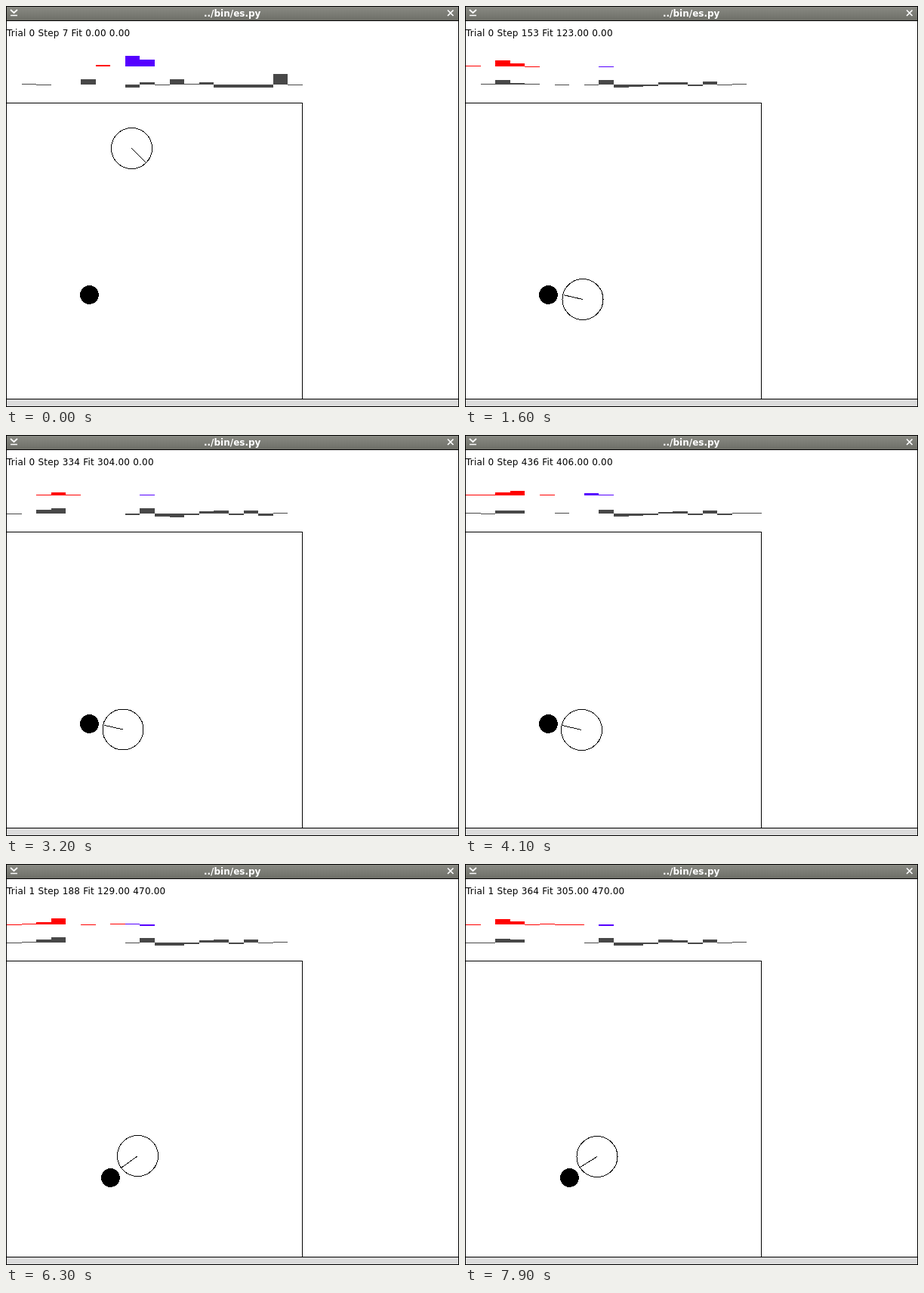
Animation, 600 px wide and 531 px high, one loop 8000 ms. Source, as an HTML page:

```html
<!DOCTYPE html>
<html lang="en">
<head>
<meta charset="utf-8">
<title>Robot trial</title>
<style>
  html, body { margin: 0; width: 100%; height: 100%; overflow: hidden; background: #fff; }
  svg { display: block; width: 600px; height: 531px; }
  text { font: 12px "DejaVu Sans", sans-serif; white-space: pre; }
  .title { font-weight: bold; fill: #fff; }
  .status { letter-spacing: .21px; }
  .crisp { shape-rendering: crispEdges; }
  .line { fill: none; stroke: #000; }
  .icon { fill: none; stroke: #fff; stroke-width: 1.7; }
</style>
</head>
<body>
<svg width="600" height="531">
  <defs>
    <linearGradient id="bar" x2="0" y2="1">
      <stop offset="0" stop-color="#8a8b84"/>
      <stop offset="1" stop-color="#6c6d66"/>
    </linearGradient>
  </defs>
  <g class="crisp">
    <rect width="600" height="531" fill="#fff"/>
    <rect width="600" height="20" fill="url(#bar)"/>
    <rect y="521" width="600" height="9" fill="#dcdcdc"/>
    <rect class="line" x=".5" y=".5" width="599" height="530"/>
    <path class="line" d="M0 19.5H600M0 520.5H600M0 128.5H392.5V520"/>
  </g>
  <path class="icon" d="M6 5l4.5 4L15 5M6 12.5h9"/>
  <path class="icon" d="M585 5.5l7.5 7.5M592.5 5.5l-7.5 7.5"/>
  <text class="title" x="262" y="14">../bin/es.py</text>
  <text class="status" id="status" x="1" y="40"></text>
  <g class="crisp">
    <path id="red" fill="#f00"/>
    <path id="blue" fill="#50f"/>
    <path id="gray" fill="#484848"/>
    <circle id="ball" r="12.4"/>
    <circle id="body" class="line" r="27"/>
    <path id="heading" class="line"/>
  </g>
</svg>
<script>
const FRAME = 100, LOOP = 8000, SECOND_TRIAL = 47;
const INPUT_BASE = 80, HIDDEN_BASE = 104;
const $ = id => document.getElementById(id);

// clock: [frame, step]; path: Bezier points of the approach; then a slow drift
const trials = [
  {
    ball: [110.5, 382.5], arrive: 30, best: 0,
    clock: [[0, 7], [8, 62], [41, 436]],
    path: [[166.5, 188.5], [235, 257], [235, 405], [156.5, 387.5]],
    drift: [-2, 3.5], turn: [193, 193], last: 492
  },
  {
    ball: [138.5, 415.5], arrive: 59, best: 470,
    clock: [[47, 3], [54, 83], [63, 188], [79, 364]],
    path: [[110, 200], [200, 150], [300, 283], [174.5, 385.5]],
    drift: [.5, 2], turn: [141, 148], last: 364
  }
];

// Unit levels at the start of a trial, and the hidden units once at the ball
const startInput = [0, 0, 0, 0, 0, 0, 2, 0, 14, 9];
const startHidden = [0, 1, -1, 0, 0, 7, 0, 0, -4, 3, -1, 7, 1, 3, -4, -4, -4, -4, 14, -1];
const restHidden = [0, 0, 0, 0, 0, 0, 0, 0, -1, 6, -4, -4, -2, 3, 3, -2, 4, -2, 1, 0];

const mix = (a, b, k) => a + (b - a) * k;
const facesBall = i => i === 2 || i === 3;

function noise(frame, i) {
  const n = Math.sin(frame * 12.9898 + i * 78.233) * 43758.5453;
  return n - Math.floor(n);
}

const jitter = (frame, i, size) => (noise(frame, i) * 2 - 1) * size;

function stepAt(clock, frame) {
  let i = 0;
  while (i < clock.length - 2 && frame >= clock[i + 1][0]) i++;
  const [f0, s0] = clock[i], [f1, s1] = clock[i + 1];
  return Math.ceil(mix(s0, s1, (frame - f0) / (f1 - f0)) - .01);
}

function approach([p0, p1, p2, p3], k) {
  const u = 1 - k;
  const at = j => u ** 3 * p0[j] + 3 * u * u * k * p1[j] + 3 * u * k * k * p2[j] + k ** 3 * p3[j];
  const slope = j => u * u * (p1[j] - p0[j]) + 2 * u * k * (p2[j] - p1[j]) + k * k * (p3[j] - p2[j]);
  return [at(0), at(1), Math.atan2(slope(1), slope(0))];
}

function hover({ path, drift, turn, arrive, last }, step) {
  const k = (step - arrive) / (last - arrive);
  const [x, y] = path[3].map((v, j) => Math.round((v + drift[j] * k) * 2) / 2);
  return [x, y, mix(...turn, k) * Math.PI / 180];
}

// Sensors facing the ball flicker strongly, the others and the motors only a little
function inputs(frame, k) {
  return startInput.map((start, i) => {
    const size = i < 8 ? 1 : 11 - i;
    const live = facesBall(i) ? 1 + 7 * noise(frame, i) : jitter(frame, i, size);
    return Math.round(mix(start, live, k));
  });
}

// Hidden units echo the facing sensors of the frame before
function hiddens(frame, k) {
  return startHidden.map((start, i) => {
    const live = facesBall(i)
      ? 1 + 7 * noise(frame - 1, i)
      : restHidden[i] + jitter(frame, i + 20, .75);
    return Math.round(mix(start, live, k));
  });
}

function bars(values, from, base) {
  return values.map((v, n) => {
    const edge = i => Math.round(1 + 19.6 * (from + i));
    return v ? `M${edge(n)} ${base}H${edge(n + 1)}v${-v}H${edge(n)}z` : "";
  }).join("");
}

function place(id, x, y) {
  $(id).setAttribute("cx", x);
  $(id).setAttribute("cy", y);
}

function draw(frame) {
  const index = frame < SECOND_TRIAL ? 0 : 1;
  const trial = trials[index];
  const step = stepAt(trial.clock, frame);
  const first = trial.clock[0][1];
  const k = Math.min(1, (step - first) / (trial.arrive - first));
  const fit = Math.max(0, step - trial.arrive);
  $("status").textContent =
    `Trial ${index} Step ${step} Fit ${fit.toFixed(2)} ${trial.best.toFixed(2)}`;

  const [x, y, angle] = k < 1 ? approach(trial.path, k) : hover(trial, step);
  place("ball", ...trial.ball);
  place("body", x, y);
  $("heading").setAttribute("d",
    `M${x} ${y}l${26 * Math.cos(angle)} ${26 * Math.sin(angle)}`);

  const input = inputs(frame, k);
  $("red").setAttribute("d", bars(input.slice(0, 8), 0, INPUT_BASE));
  $("blue").setAttribute("d", bars(input.slice(8), 8, INPUT_BASE));
  $("gray").setAttribute("d", bars(hiddens(frame, k), 0, HIDDEN_BASE));
}

let shown = -1;
function tick() {
  const frame = Math.floor(performance.now() % LOOP / FRAME);
  if (frame !== shown) draw(shown = frame);
  requestAnimationFrame(tick);
}
tick();
</script>
</body>
</html>
```
